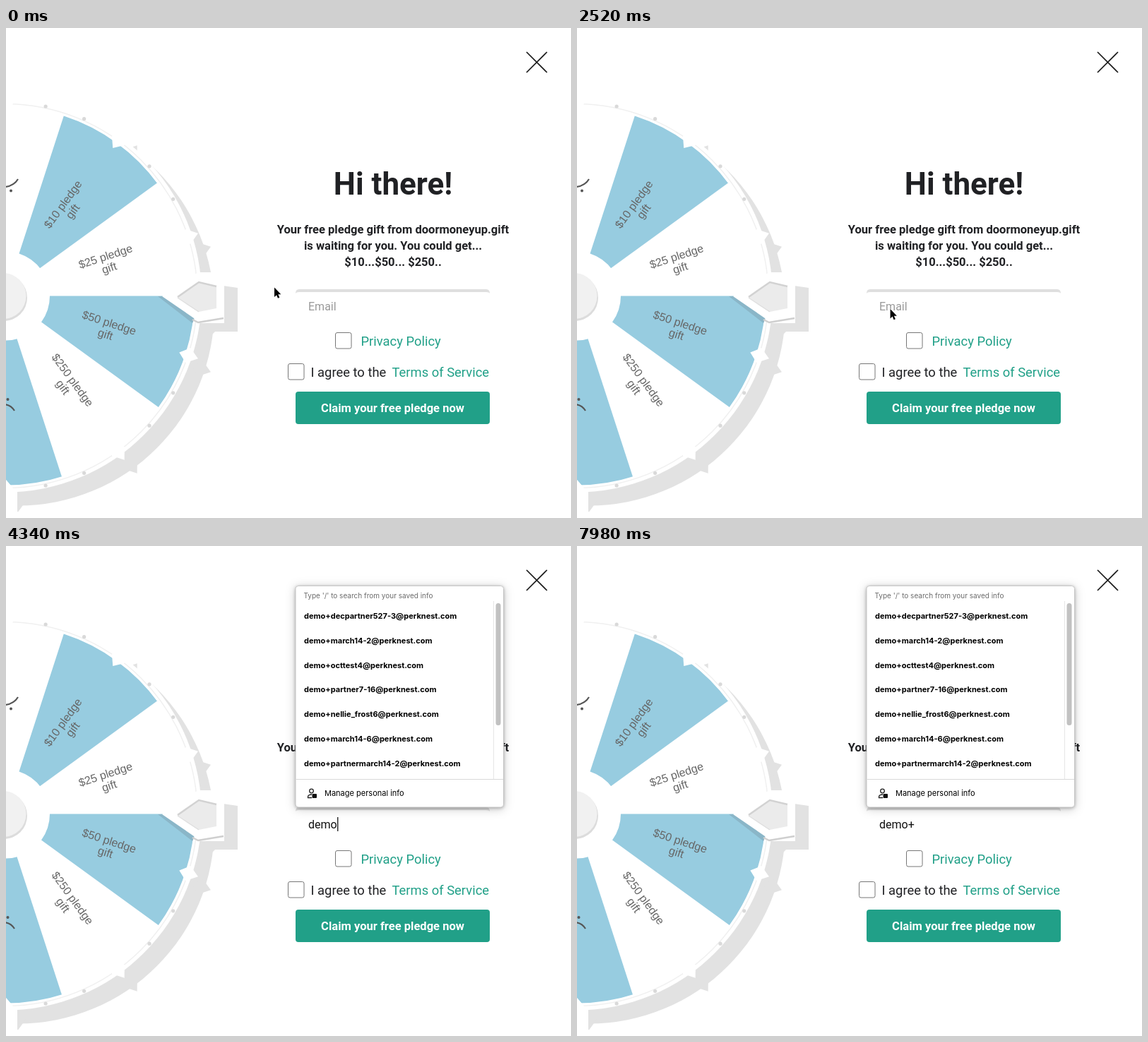
An HTML page for the animation above (8 s loop, 800x694 px).

```html
<!DOCTYPE html>
<html lang="en">
<head>
<meta charset="utf-8">
<title>Pledge wheel</title>
<style>
  html, body { margin: 0; width: 100%; height: 100%; overflow: hidden; background: #fff; }
  svg { display: block; width: 800px; height: 694px; }
  text { font-family: Roboto, sans-serif; fill: #202124; }
  .mid { text-anchor: middle; }
  .title { font-size: 44px; font-weight: 700; }
  .lead { font-size: 16.55px; font-weight: 700; }
  .label { font-size: 18.4px; }
  .link { fill: #21a088; }
  .prize { font: 16px "Liberation Sans", Arial, sans-serif; fill: #666; text-anchor: middle; }
  .box { fill: #fff; stroke: #767676; }
  .popup text { font: 11px Inter, sans-serif; fill: #000; }
  .popup .hint { font-size: 10px; fill: #6b6b6b; }
  .popup .mail { font-weight: 700; }
  .sheet { filter: drop-shadow(0 1px 2px rgba(0, 0, 0, .25)) drop-shadow(0 2px 7px rgba(0, 0, 0, .2)); }
  #field { font-size: 16px; }
</style>
</head>
<body>
<svg viewBox="0 0 800 694">
  <g id="wheel"></g>

  <!-- pointer -->
  <path d="M215 380H222L267 411L264 418Z" fill="#8ab6c8"/>
  <path d="M221 380L272 346L309 353V412L270 417L266 411Z" fill="#fff"/>
  <path d="M264 413L272 417L308 411" fill="none" stroke="#cfcfcf" stroke-width="2.5" stroke-linejoin="round"/>
  <path d="M243 381L273 361L298 367V397L273 402Z" fill="#ebebeb"/>
  <path d="M243 381L273 360L298 366" fill="none" stroke="#d2d2d2" stroke-width="2.5"/>
  <path d="M243 382L273 402" fill="none" stroke="#dedede" stroke-width="1.5"/>

  <!-- form -->
  <path d="M737 34L766 63M766 34L737 63" stroke="#1a1a1a" stroke-width="1.700"/>
  <text class="title mid" x="548" y="236">Hi there!</text>
  <g class="lead mid">
    <text x="548" y="291">Your free pledge gift from doormoneyup.gift</text>
    <text x="548" y="314">is waiting for you. You could get...</text>
    <text x="548" y="337">$10...$50... $250..</text>
  </g>
  <path d="M410 376Q410 370 415 370H680Q685 370 685 376Q684 374 680 374H415Q411 374 410 376Z" fill="#dfdfdf"/>
  <rect class="box" x="466.500" y="431.500" width="22.500" height="22.500" rx="2.500"/>
  <rect class="box" x="399.500" y="475.500" width="22.500" height="22.500" rx="2.500"/>
  <g class="label">
    <text class="link" x="502.500" y="450">Privacy Policy</text>
    <text x="431.500" y="494">I agree to the</text>
    <text class="link" x="546.500" y="494">Terms of Service</text>
  </g>
  <rect x="410" y="515" width="275" height="46" rx="4" fill="#21a088"/>
  <text class="lead mid" x="547.500" y="544" style="fill:#fff">Claim your free pledge now</text>
  <text id="field" x="428" y="400"></text>
  <rect id="caret" y="384" width="1.200" height="20"/>

  <!-- saved info -->
  <g id="popup" class="popup">
    <rect class="sheet" x="410" y="56.500" width="294.500" height="313.500" rx="4" fill="#fff" stroke="#c6c6c6"/>
    <text class="hint" x="421.500" y="73.500">Type '/' to search from your saved info</text>
    <g id="mails"></g>
    <path d="M690.500 78V330" stroke="#e6e6e6"/>
    <path d="M410.500 330.500H704" stroke="#d9d9d9"/>
    <rect x="693.500" y="81" width="7" height="173" rx="3.500" fill="#c1c1c1"/>
    <g fill="none" stroke="#222" stroke-width="1.300">
      <circle cx="432.500" cy="347" r="2.800"/>
      <path d="M433 356.500H427.500V355Q428 352 433 352"/>
    </g>
    <rect x="433.500" y="351" width="6.500" height="6" rx="1" fill="#111"/>
    <text x="451" y="354">Manage personal info</text>
  </g>

  <path id="cursor" d="M0 0V13.500L3 10.700L5 15.300L7.300 14.300L5.300 9.800H9.300Z" fill="#000" stroke="#fff" stroke-width="1" paint-order="stroke"/>
</svg>

<script>
  const $ = id => document.getElementById(id);
  const CX = -1, CY = 379.5, R = 268, HUB = 63, RIM = 278;

  // Angles run counter-clockwise from the right, in degrees.
  const polar = (r, deg) => {
    const a = deg * Math.PI / 180;
    return `${(CX + r * Math.cos(a)).toFixed(1)} ${(CY - r * Math.sin(a)).toFixed(1)}`;
  };
  const slice = from =>
    `<path d="M${polar(HUB, from)}L${polar(R, from)}A${R} ${R} 0 0 0 ${polar(R, from + 36)}` +
    `L${polar(HUB, from + 36)}A${HUB} ${HUB} 0 0 1 ${polar(HUB, from)}Z" fill="#97cce0"/>`;
  const spoke = deg => `<path d="M${polar(HUB - 5, deg)}L${polar(R + 2, deg)}" stroke="#fff" stroke-width="6"/>`;
  const peg = deg =>
    `<path transform="translate(${CX} ${CY}) rotate(${-deg})" d="M259 0L272 -11L287 0L272 11Z"/>`;
  const light = deg => {
    const [x, y] = polar(274.5, deg).split(' ');
    return `<circle cx="${x}" cy="${y}" r="2.6" fill="#d9d9d9"/>`;
  };
  const prize = (x, y, deg, sum) =>
    `<g transform="translate(${x} ${y}) rotate(${deg})">` +
    `<text class="prize" y="5">$${sum} pledge</text><text class="prize" y="22">gift</text></g>`;
  const each = (list, make) => list.map(make).join('');

  const disc = `<circle cx="${CX}" cy="${CY}" r="${RIM}"/>`;
  const pegs = each([90, 54, 18, -18, -54, -90], peg);
  $('wheel').innerHTML =
    `<clipPath id="cut"><path d="M16 100H340V694H16Z"/></clipPath>
     <g fill="#e2e2e2" clip-path="url(#cut)">
       <g transform="translate(18 19)">${disc}${pegs}</g>
       <path d="M300 364L328 368V430H296L286 440L262 425Z"/>
     </g>
     <g fill="#fff">${disc}<path d="M262 346H309V418H270Z"/></g>
     <circle cx="${CX}" cy="${CY}" r="272" fill="none" stroke="#f0f0f0" stroke-width="1.5"/>
     ${each([36, -36, -108], slice)}${each([36, -72], spoke)}
     <g fill="#fff">${pegs}</g>
     ${each([78, 66, 42, 30, -30, -42, -66, -78], light)}
     <circle cx="-3" cy="382" r="33" fill="#dcdcdc"/>
     <circle cx="-4" cy="379.5" r="32.5" fill="#f1f1f1"/>
     ${prize(81, 250, -54, 10)}${prize(141, 324, -18, 25)}
     ${prize(146, 418, 18, 50)}${prize(94, 499, 54, 250)}
     <g fill="none" stroke="#555" stroke-width="2.2"><path d="M-2 225Q11 224 17 214"/><path d="M-2 533Q7 534 12 542"/></g>
     <g fill="#555"><circle cx="7" cy="230.5" r="2"/><circle cx="2.5" cy="526" r="2"/></g>`;

  const saved = [
    'tarvolen@brundoklabs.com', 'mirel@doormoneyup.gift', 'mtarvolen@zumpost.com',
    'mireltarvolen@kpost.com', 'hello@doormoneyup.gift', 'mirel@roofmoneyowls.com',
    'signalbox@brundoklabs.com'
  ];
  const matches = [
    'decpartner527-3', 'march14-2', 'octtest4', 'partner7-16',
    'nellie_frost6', 'march14-6', 'partnermarch14-2'
  ].map(name => `demo+${name}@perknest.com`);
  $('mails').innerHTML = each(saved, (_, i) =>
    `<text class="mail" x="422" y="${(102.8 + i * 34.85).toFixed(1)}"></text>`);
  const rows = [...$('mails').children];

  const LOOP = 8000, CLICK = 2660, MATCH = 4200;
  const keys = [[3990, 'd'], [4130, 'de'], [4200, 'dem'], [4270, 'demo'], [5040, 'demo+']];
  const path = [[0, 380, 367.5], [1680, 380, 367.5], [1820, 381, 369.5], [2000, 382, 370.5], [2590, 446, 399]];

  function cursorAt(t) {
    const i = path.findIndex(p => p[0] > t);
    if (i < 0) return path[path.length - 1].slice(1);
    const [a, b] = [path[i - 1], path[i]];
    const u = (t - a[0]) / (b[0] - a[0]), k = u * u * (3 - 2 * u);
    return [a[1] + (b[1] - a[1]) * k, a[2] + (b[2] - a[2]) * k];
  }
  const show = (el, on) => el.setAttribute('visibility', on ? 'visible' : 'hidden');

  function draw(now) {
    const t = now % LOOP;
    const open = t >= CLICK;
    const key = keys.filter(k => k[0] <= t).pop();
    const field = $('field');

    field.textContent = key ? key[1] : 'Email';
    field.style.fill = open ? '#111' : '#999';
    $('caret').setAttribute('x', 428.5 + (key ? field.getComputedTextLength() : 0));
    show($('caret'), open && (t - (key ? key[0] : CLICK)) % 1000 < 500);

    show($('popup'), open);
    const list = t < MATCH ? saved : matches;
    rows.forEach((row, i) => { row.textContent = list[i]; });

    show($('cursor'), !key);
    $('cursor').setAttribute('transform', `translate(${cursorAt(t)})`);
    requestAnimationFrame(() => draw(performance.now()));
  }
  draw(performance.now());
</script>
</body>
</html>
```
